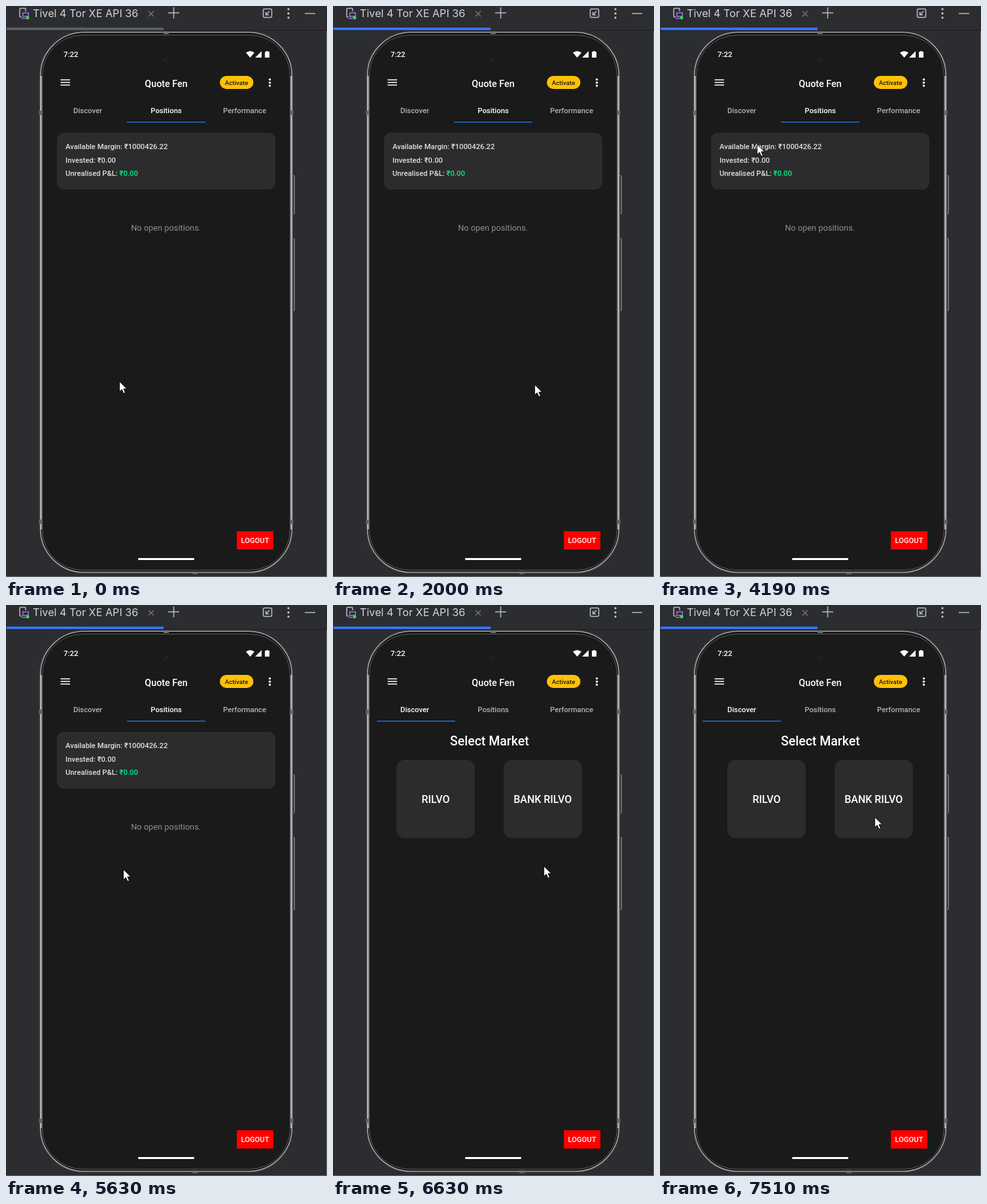
Write an HTML page that moves like this. It is 491x874 px and loops after 8 s.

```html
<!DOCTYPE html>
<html lang="en">
<head>
<meta charset="utf-8">
<title>Phone emulator</title>
<style>
  html, body { margin: 0; width: 100%; height: 100%; overflow: hidden; background: #2b2d30; }
  svg { display: block; width: 491px; height: 874px; }
  text { font: 500 11.25px Roboto, "Noto Sans", sans-serif; fill: #fff; }
  .mid { text-anchor: middle; }
  .line { fill: none; stroke: #b9bcc3; stroke-width: 1.5; }
  .card { fill: #2c2c2e; }
  .soft text { fill: #e0e0e0; }
  .tabs text { font-size: 11.3px; }
</style>
</head>
<body>
<svg viewBox="0 0 491 874">
  <rect width="491" height="874" fill="#2b2d30"/>
  <path d="M0 37.5H491" stroke="#1e1f22"/>
  <path d="M490.5 38V873.5H0" fill="none" stroke="#66696d"/>

  <!-- tool window tab -->
  <g class="line">
    <path d="M24 17H22.5Q21 17 21 15.5V5Q21 3.5 22.5 3.5H28.5Q30 3.5 30 5V8"/>
    <path d="M25.7 10.5H34.3V16H25.7ZM24 19H30" stroke="#a571e6"/>
    <path d="M218 8L226 16M226 8L218 16" stroke="#777a80" stroke-width="1.2"/>
    <path d="M248 10.5H265M256.5 2V19M457 11.5H473"/>
    <rect x="393.5" y="4.5" width="13" height="13" rx="2"/>
    <path d="M403 8L397.5 13.5M397.5 9V13.5H402"/>
  </g>
  <circle cx="33" cy="18" r="2.5" fill="#35e04c"/>
  <g fill="#c9ccd2"><circle cx="432" cy="4.8" r="1.6"/><circle cx="432" cy="11.3" r="1.6"/><circle cx="432" cy="17.8" r="1.6"/></g>
  <text x="41" y="17" style="font:16.2px Inter,sans-serif;fill:#d0d3d9">Tivel 4 Tor XE API 36</text>
  <rect id="bar" x="1" y="33" width="240" height="4"/>

  <!-- phone body -->
  <g fill="#1b1b1c" stroke="#b8b8b8">
    <rect x="438.5" y="259.5" width="2.5" height="59" rx="1.2"/>
    <rect x="438.5" y="355.5" width="2.5" height="111" rx="1.2"/>
  </g>
  <rect x="51" y="38.5" width="388" height="830" rx="68" fill="#161616" stroke="#3c3c3c"/>
  <rect x="52.7" y="40.2" width="384.6" height="826.6" rx="66.5" fill="none" stroke="#a6a6a6" stroke-width="1.6"/>
  <rect x="55.5" y="44.5" width="379" height="819" rx="62" fill="#1a1a1a" stroke="#5c5c5c"/>
  <path d="M53.3 107V801M436.7 107V801" stroke="#b4b4b4" stroke-width="2.8"/>
  <path d="M50.5 163.5H55.5M434.5 163.5H439.5M50.5 789.5H55.5M434.5 789.5H439.5" stroke="#666" stroke-width="7"/>
  <path d="M241 41H249M285 867.5H293" stroke="#707070" stroke-width="4"/>
  <path d="M242 82.5h2M246 79.5h1.5" stroke="#34346e" stroke-width="1.5"/>

  <!-- status bar and header -->
  <text x="88" y="78" style="font-size:11.5px">7:22</text>
  <path fill="#fff" d="M367 71.5Q373.5 66.5 380 71.5L373.5 79ZM381 79L391 69V79ZM396 70H398V69H401V70H403V79H396Z"/>
  <path d="M83.5 113H98M83.5 117H98M83.5 121H98" stroke="#fff" stroke-width="1.7"/>
  <text class="mid" x="245" y="123.5" style="font-size:14.3px">Quote Fen</text>
  <rect x="327" y="107" width="51.5" height="20" rx="10" fill="#ffc107"/>
  <text class="mid" x="352.6" y="121" style="font-size:9.7px;fill:#1a1a1a">Activate</text>
  <g fill="#fff"><circle cx="403.5" cy="112.4" r="1.7"/><circle cx="403.5" cy="117.2" r="1.7"/><circle cx="403.5" cy="122" r="1.7"/></g>

  <g class="tabs mid">
    <text id="discover" x="125" y="164">Discover</text>
    <text id="positions" x="245" y="164">Positions</text>
    <text x="365" y="164" style="fill:#b4b4b4">Performance</text>
  </g>
  <rect id="underline" y="177" width="120" height="1.4" fill="#1f78dc"/>

  <g id="positionsPage">
    <rect class="card" x="78" y="194" width="334" height="87" rx="11"/>
    <g class="soft">
      <text x="91" y="219">Available Margin: ₹1000426.22</text>
      <text x="91" y="239.5">Invested: ₹0.00</text>
      <text x="91" y="259.7">Unrealised P&amp;L: <tspan fill="#00f088">₹0.00</tspan></text>
    </g>
    <text class="mid" x="244.7" y="344" style="font-weight:400;font-size:12.8px;fill:#8e8e8e">No open positions.</text>
  </g>

  <g id="discoverPage" class="mid">
    <text x="245.3" y="215" style="font-size:19.5px">Select Market</text>
    <rect class="card" x="103" y="237" width="120" height="120" rx="13"/>
    <rect class="card" x="267" y="237" width="120" height="120" rx="13"/>
    <text x="163" y="303" style="font-size:16px">RILVO</text>
    <text x="326.7" y="303" style="font-size:16px">BANK RILVO</text>
  </g>

  <rect x="353" y="804" width="56" height="28" fill="#f00"/>
  <text class="mid" x="381" y="822" style="font-size:11.2px">LOGOUT</text>
  <rect x="202" y="845" width="86" height="3" rx="1.2" fill="#fff"/>

  <path id="cursor" d="M.6 .8V16.4L4.2 13 6.9 19 9.5 17.9 6.9 12H11.8Z" fill="#fff" stroke="#000" stroke-width=".9"/>
</svg>
<script>
  const LOOP = 8000;
  const $ = id => document.getElementById(id);

  // Each row: start time in ms, then the values held until the next row.
  const pointer = [
    [0, 173, 574], [140, 245, 577], [260, 308, 579], [3370, 288, 529],
    [3520, 268, 420], [3640, 233, 306], [4070, 185, 255], [4190, 148, 211],
    [4560, 168, 285], [4680, 183, 355], [5390, 182, 374], [5510, 180, 394],
    [5630, 179, 404], [6070, 250, 402], [6200, 322, 399], [7240, 277, 345],
    [7360, 297, 325], [7510, 328, 324]
  ];
  // Page offset and underline position.
  const pager = [[0, 0, 185], [6630, -6, 67], [6750, -1, 65.3], [6870, 0, 65]];

  const held = (rows, t) => rows.findLast(row => row[0] <= t);
  const move = (id, x, y) => $(id).setAttribute('transform', `translate(${x} ${y})`);
  const show = (id, on) => $(id).style.display = on ? '' : 'none';

  function draw() {
    const t = performance.now() % LOOP;
    const [, x, y] = held(pointer, t);
    const [, shift, line] = held(pager, t);
    const discover = t >= 6630;

    move('cursor', x, y);
    move('discoverPage', shift, 0);
    move('underline', line, 0);
    show('discoverPage', discover);
    show('positionsPage', !discover);
    $('discover').style.fill = discover ? '#fff' : '#b4b4b4';
    $('positions').style.fill = discover ? '#b4b4b4' : '#fff';
    $('bar').style.fill = t < 2000 ? '#5a5d63' : '#3574f0';
    requestAnimationFrame(draw);
  }
  draw();
</script>
</body>
</html>
```
